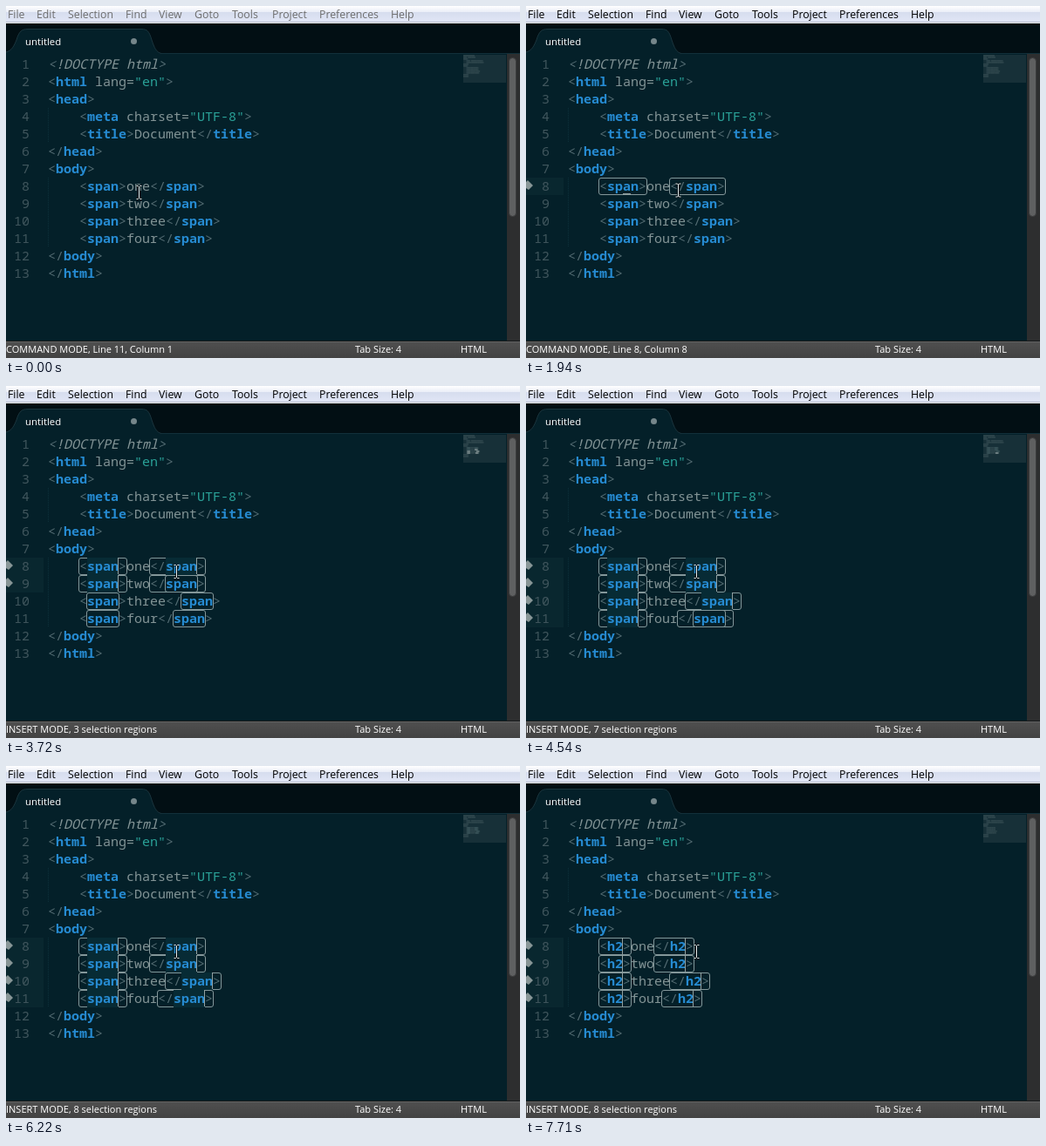
An HTML page that plays this animation: 589 px wide and 404 px high, repeating every 7.99 s.

```html
<!DOCTYPE html>
<html lang="en">
<head>
<meta charset="UTF-8">
<title>Multi-cursor editing</title>
<style>
  html, body { margin: 0; width: 100%; height: 100%; overflow: hidden; background: #042029; }
  svg { display: block; width: 100vw; height: 100vh; }
  text { white-space: pre; }
  .code { font: 15px "Noto Sans Mono", "DejaVu Sans Mono", monospace; }
  .menu { font: 12.3px "Open Sans", "Noto Sans", sans-serif; }
  .small { font: 11px "Open Sans", "Noto Sans", sans-serif; fill: #fff; }
  .tab { font-size: 11.4px; }
  .num { fill: #40565d; text-anchor: end; }
  .punct { fill: #536b72; }
  .name { fill: #268bd2; font-weight: bold; }
  .plain { fill: #839496; }
  .str { fill: #2aa198; }
  .doctype { font-style: italic; }
  .box { fill: none; stroke: #84979a; }
  .pick { fill: #072b35; }
</style>
</head>
<body>
<svg viewBox="0 0 589 404">
  <defs>
    <linearGradient id="bar" x2="0" y2="1">
      <stop stop-color="#fff"/>
      <stop offset=".4" stop-color="#e9edf7"/>
      <stop offset=".4" stop-color="#d6ddee"/>
      <stop offset="1" stop-color="#e1e6f6"/>
    </linearGradient>
    <linearGradient id="foot" x2="0" y2="1">
      <stop stop-color="#505050"/>
      <stop offset="1" stop-color="#424242"/>
    </linearGradient>
  </defs>
  <rect width="589" height="404" fill="#042029"/>
  <rect y="18" width="589" height="36" fill="#020f14"/>
  <path d="M178 54.5H589" stroke="#12303a"/>
  <path d="M0 55V53C7 51 9 46 12 39C15 29 18 26.5 25 26.5H155C162 26.5 164 29 167 39C170 48 172 53 178 54.5V55Z" fill="#042029"/>
  <path d="M0 53C7 51 9 46 12 39C15 29 18 26.5 25 26.5H155C162 26.5 164 29 167 39C170 48 172 53 178 54.5" fill="none" stroke="#1b353e"/>
  <text class="small tab" x="22" y="44.5">untitled</text>
  <circle cx="146.5" cy="40.5" r="3.5" fill="#75868a"/>
  <rect width="589" height="18" fill="url(#bar)"/>
  <path d="M0 18.5H589" stroke="#b6bccc"/>
  <path d="M0 19.5H589" stroke="#f0f0f0"/>
  <g id="menu" class="menu"></g>
  <g id="gutter"></g>
  <path d="M48.5 117V157M48.5 197V277" stroke="#0d303a" stroke-dasharray="1 1"/>
  <g id="marks"></g>
  <g id="code" class="code"></g>
  <g id="carets" fill="#93a1a1"></g>
  <rect x="524" y="56" width="49" height="32" fill="#173038"/>
  <g id="map"></g>
  <rect x="574" y="55" width="15" height="330" fill="#2d2e2f"/>
  <rect x="576.5" y="59.5" width="8" height="182" rx="4" fill="#5f6061" stroke="#3a3b3c"/>
  <rect y="385" width="589" height="19" fill="url(#foot)"/>
  <path d="M0 384.5H589" stroke="#171a1b"/>
  <path d="M0 385.5H589" stroke="#626262"/>
  <text id="status" class="small" x="0" y="398"></text>
  <text class="small" x="400" y="398">Tab Size: 4</text>
  <text class="small" x="521" y="398">HTML</text>
  <g id="mouse" fill="none">
    <path d="M-3 -7.5H-1L0 -6.5L1 -7.5H3M0 -6.5V6.5M-3 7.5H-1L0 6.5L1 7.5H3" stroke="#001016" stroke-width="2.6"/>
    <path d="M-3 -7.5H-1L0 -6.5L1 -7.5H3M0 -6.5V6.5M-3 7.5H-1L0 6.5L1 7.5H3" stroke="#e8eeee"/>
  </g>
</svg>
<script>
const LOOP = 7990, CHAR = 9, LEFT = 48, FIRST = 7;
const words = ["one", "two", "three", "four"];
const picks = [3030, 3420, 3720, 3840, 3960, 4270, 4540, 5090];
const blink = [[0, 0], [1690, 1], [2330, 0], [2720, 1], [4940, .4], [5090, 1], [5400, .5],
  [5520, 0], [6220, 1], [7000, .5], [7130, 0], [7560, .4], [7710, 1]];
const path = [[0, 152.5, 214], [160, 147.5, 213.5], [300, 123.5, 211], [450, 116.5, 207.5],
  [600, 108.5, 204.5], [750, 106.5, 207], [870, 106.5, 210], [1020, 108.5, 211],
  [1140, 110.5, 211], [1940, 174.5, 211.5], [2090, 195.5, 213]];
const menus = { File: 2, Edit: 35, Selection: 71, Find: 137, View: 175, Goto: 216,
  Tools: 259, Project: 305, Preferences: 359, Help: 441 };

const el = id => document.getElementById(id);
const at = (list, t) => list.filter(p => t >= p[0]).pop();
const colX = col => LEFT + col * CHAR;
const rowY = row => 57 + row * 20;
const rect = (x, y, w, h, extra = "") => `<rect x="${x}" y="${y}" width="${w}" height="${h}" ${extra}/>`;
const esc = s => s.replace(/</g, "&lt;").replace(/>/g, "&gt;");
const box = (row, from, to) =>
  rect(colX(from) - .5, rowY(row) + .5, (to - from) * CHAR + 1, 19, 'class="box" rx="2.5"');
const caret = (row, col) => rect(colX(col) - 1, rowY(row), 1, 19);

function source(name) {
  return ["<!DOCTYPE html>", '<html lang="en">', "<head>", '    <meta charset="UTF-8">',
    "    <title>Document</title>", "</head>", "<body>",
    ...words.map(w => `    <${name}>${w}</${name}>`), "</body>", "</html>"];
}

function tokens(line) {
  const kinds = ["punct", "name", "str", "plain"];
  return [...line.matchAll(/(<\/?|>)|((?<=<\/?)\w+)|("[^"]*")|([^<>"]+)/g)]
    .map(m => ({ text: m[0], col: m.index, kind: kinds[m.slice(1).findIndex(Boolean)] }))
    .filter(k => k.text.trim());
}

// Column range of the name inside an opening (0) or closing (1) tag
function span(i, name) {
  const from = i % 2 ? 5 + name.length + 1 + words[i >> 1].length + 2 : 5;
  return { row: FIRST + (i >> 1), from, to: from + name.length };
}

function state(t) {
  const count = picks.filter(p => t >= p).length;
  const active = t >= 1690, insert = t >= 2720;
  const where = !active ? "Line 11, Column 1" : !count ? "Line 8, Column 8"
    : count < 2 ? "4 characters selected" : count + " selection regions";
  return {
    count, active, insert,
    name: t < 6340 ? "span" : t < 6610 ? "h" : "h2",
    matches: t >= 3150, mapped: t >= 3270,
    caret: at(blink, t)[1],
    status: (insert ? "INSERT" : "COMMAND") + " MODE, " + where
  };
}

function drawCode(name) {
  let code = "", map = "";
  source(name).forEach((line, row) => {
    const y = rowY(row) + 15;
    code += `<text class="num" x="27" y="${y}">${row + 1}</text>`;
    for (const k of tokens(line)) {
      const lead = k.text.length - k.text.trimStart().length;
      const style = k.kind + (row ? "" : " doctype");
      code += `<text class="${style}" x="${colX(k.col + lead)}" y="${y}">${esc(k.text.trim())}</text>`;
      map += rect(524 + (k.col + lead) * .87, 56.3 + row * 2, k.text.trim().length * .87, 1.2,
        'class="plain" opacity=".3"');
    }
  });
  el("code").innerHTML = code;
  return map;
}

function draw(s) {
  const all = words.length * 2, typing = s.name !== "span";
  const lines = s.active ? Math.max(1, Math.ceil(s.count / 2)) : 0;
  let gutter = "", marks = "", carets = "", map = drawCode(s.name);

  for (let i = 0; i < lines; i++) {
    const y = rowY(FIRST + i);
    gutter += rect(0, y, 43, 20, 'fill="#09272f"') +
      `<path d="M0 ${y + 5}L2 ${y + 3}L8 ${y + 9}L3 ${y + 14}L0 ${y + 12}Z" fill="#879596"/>`;
  }
  for (let i = 0; i < all; i++) {
    const { row, from, to } = span(i, s.name);
    const picked = i < s.count;
    if (i >> 1 < lines) marks += box(row, from - 1 - i % 2, to + 1);
    if (typing) {
      carets += caret(row, to);
      continue;
    }
    if (picked) {
      marks += rect(colX(from), rowY(row), (to - from) * CHAR, 20, 'class="pick"');
      carets += caret(row, to);
    } else if (s.matches) marks += box(row, from, to);
    if (s.mapped) {
      map += rect(524 + from * .87, 56 + row * 2, 3.5, 2,
        `fill="${picked ? "#3d5960" : "#a0adad"}" opacity=".55"`);
    }
  }
  if (s.active && !s.count) carets = s.insert ? caret(FIRST, 7) : rect(colX(7), 215, 9, 1);

  el("gutter").innerHTML = gutter;
  el("marks").innerHTML = marks;
  el("carets").innerHTML = carets;
  el("carets").setAttribute("opacity", s.caret);
  el("map").innerHTML = map;
  el("menu").setAttribute("fill", s.active ? "#000" : "#6d6d6d");
  el("status").textContent = s.status;
}

el("menu").innerHTML = Object.entries(menus)
  .map(([label, x]) => `<text x="${x}" y="14">${label}</text>`).join("");

let last = "";
function tick(now) {
  const t = (now - start) % LOOP;
  const s = state(t), key = JSON.stringify(s);
  if (key !== last) draw(s);
  last = key;
  const [, x, y] = at(path, t);
  el("mouse").setAttribute("transform", `translate(${x} ${y})`);
  requestAnimationFrame(() => tick(performance.now()));
}
const start = performance.now();
tick(start);
</script>
</body>
</html>
```
